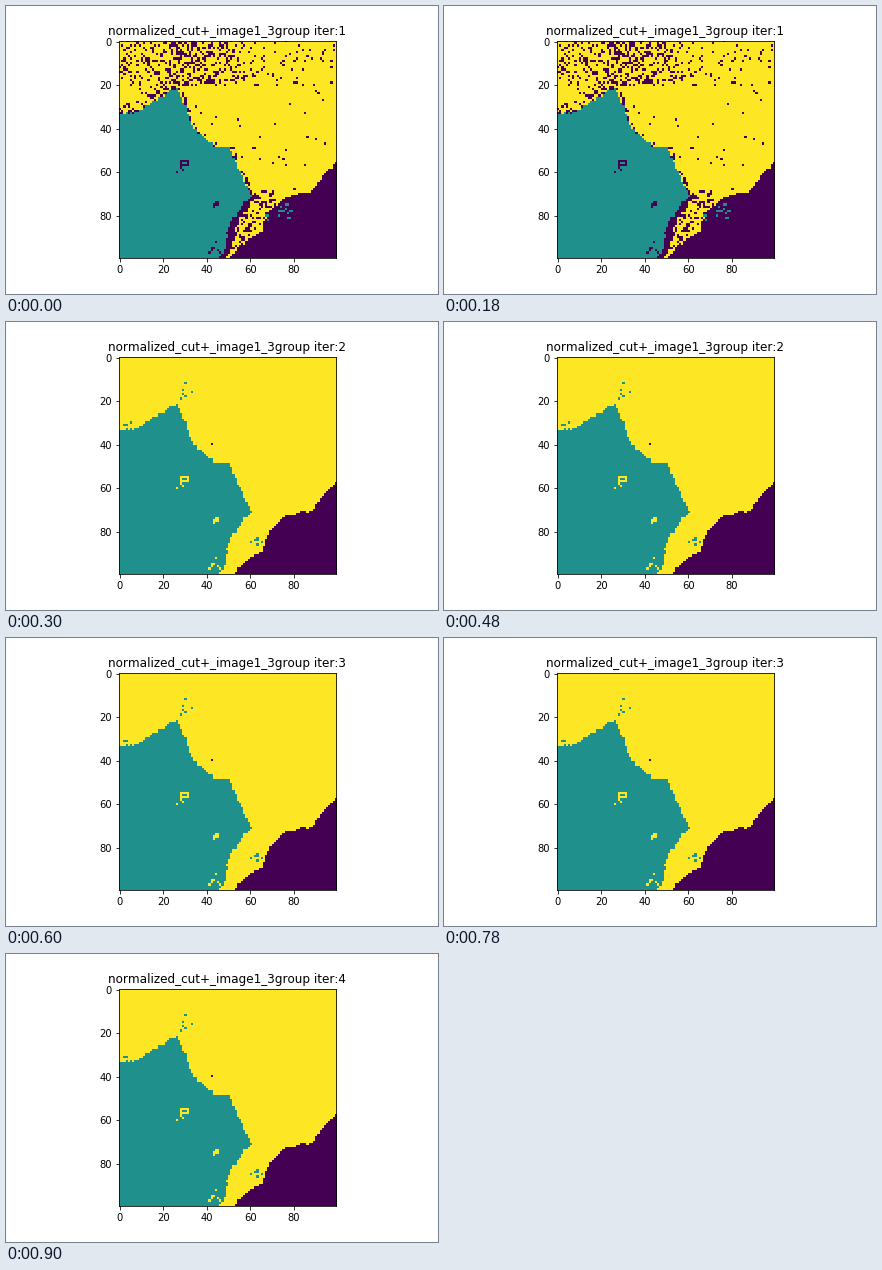
A matplotlib script for the animation above (1.2 s loop, 432x288 px).

```python
import numpy as np
import matplotlib.pyplot as plt
from matplotlib.animation import FuncAnimation

N = 100
PURPLE, TEAL, YELLOW = 0, 1, 2
rng = np.random.default_rng(4)
rows, cols = np.mgrid[:N, :N]
line = np.arange(N)


def edge(*points):
    """Piecewise-linear border with a slight pixel wobble."""
    at, value = zip(*points)
    return np.interp(line, at, value) + rng.uniform(-0.4, 0.4, N)


def scatter(col, row, count, spread):
    """Mask of a loose cluster of cells."""
    mask = np.zeros((N, N), bool)
    c, r = np.rint(rng.normal((col, row), spread, (count, 2))).astype(int).T
    mask[np.clip(r, 0, N - 1), np.clip(c, 0, N - 1)] = True
    return mask


def chance(p):
    return rng.random((N, N)) < p


# signed distances: above the hill's roof, right of its wall, below the slope
roof = edge((0, 33), (6, 33), (14, 28.5), (26, 21.5))
wall = edge((21, 26), (33, 31), (40, 33.5), (48, 43), (49, 50), (60, 55),
            (71, 60), (73, 58), (82, 51.5), (88, 49), (95, 48.5), (99, 45.5))
slope = edge((51, 100), (58, 93.5), (65, 89), (69, 79), (76, 72.8),
             (88, 70.3), (93, 63), (99, 57.5))
above = roof - rows
beyond = cols - wall[:, None]
below = np.where(cols > 50, rows - slope, -N)

hill = (above <= 0) & (beyond <= 0)
corner = below >= 0
holes = (scatter(29, 57, 14, 1.5) | scatter(44, 75, 7, 1)
         | scatter(42, 95, 7, 2)) & hill
strays = scatter(31, 16, 7, 2.5) | scatter(63, 85, 7, 1)


def settled():
    g = np.full((N, N), YELLOW)
    g[strays] = TEAL
    g[corner] = PURPLE
    g[hill] = TEAL
    g[holes] = YELLOW
    g[40, 42] = PURPLE
    g[31, 2:4] = TEAL
    return g


def second():
    g = settled()
    g[30, 5] = TEAL
    g[94, 57] = YELLOW
    return g


def first():
    g = np.full((N, N), YELLOW)
    fade = 0.42 * np.exp(-((cols - 34) / 25) ** 2)
    sky = np.maximum(fade, np.where(cols < 34, 0.2, 0.06))
    g[chance(np.where(rows < 21, sky, 0.01))] = PURPLE
    left_rim = (above > 0) & (above < 8) & (cols < 26)
    g[left_rim & chance(0.5 * np.exp(-above / 5))] = PURPLE
    right_rim = (beyond > 0) & (beyond <= 2) & (rows > 21)
    g[right_rim & chance(0.35)] = PURPLE
    gap = (rows > 68) & (beyond > 0) & (cols < 72)
    g[gap & chance(0.3)] = PURPLE
    g[(rows > 70) & (beyond > 0) & (beyond <= 3)] = PURPLE
    g[(below >= -1.5) & (cols > 51)] = PURPLE
    g[scatter(76, 78, 14, 1.6) | scatter(68, 81, 4, 1)] = TEAL
    g[hill] = TEAL
    g[holes] = PURPLE
    return g


steady = settled()
states = [first(), second(), steady, steady]

# kerning factor 6 spaces glyphs on whole pixels
plt.rcParams.update({"font.family": "DejaVu Sans", "text.kerning_factor": 6})
fig, ax = plt.subplots(figsize=(6, 4), dpi=72, facecolor="white")
fig.subplots_adjust(left=0.125, right=0.9, bottom=0.125, top=0.88)
image = ax.imshow(states[0], cmap="viridis", vmin=0, vmax=2,
                  interpolation="nearest")
ax.set_xticks(range(0, N, 20))
ax.set_yticks(range(0, N, 20))
title = ax.set_title("", fontsize=12)


def update(i):
    image.set_data(states[i])
    title.set_text(f"normalized_cut+_image1_3group iter:{i + 1}")
    return image, title


anim = FuncAnimation(fig, update, frames=len(states), interval=300,
                     repeat=True, repeat_delay=0, blit=False)
plt.show()
```
